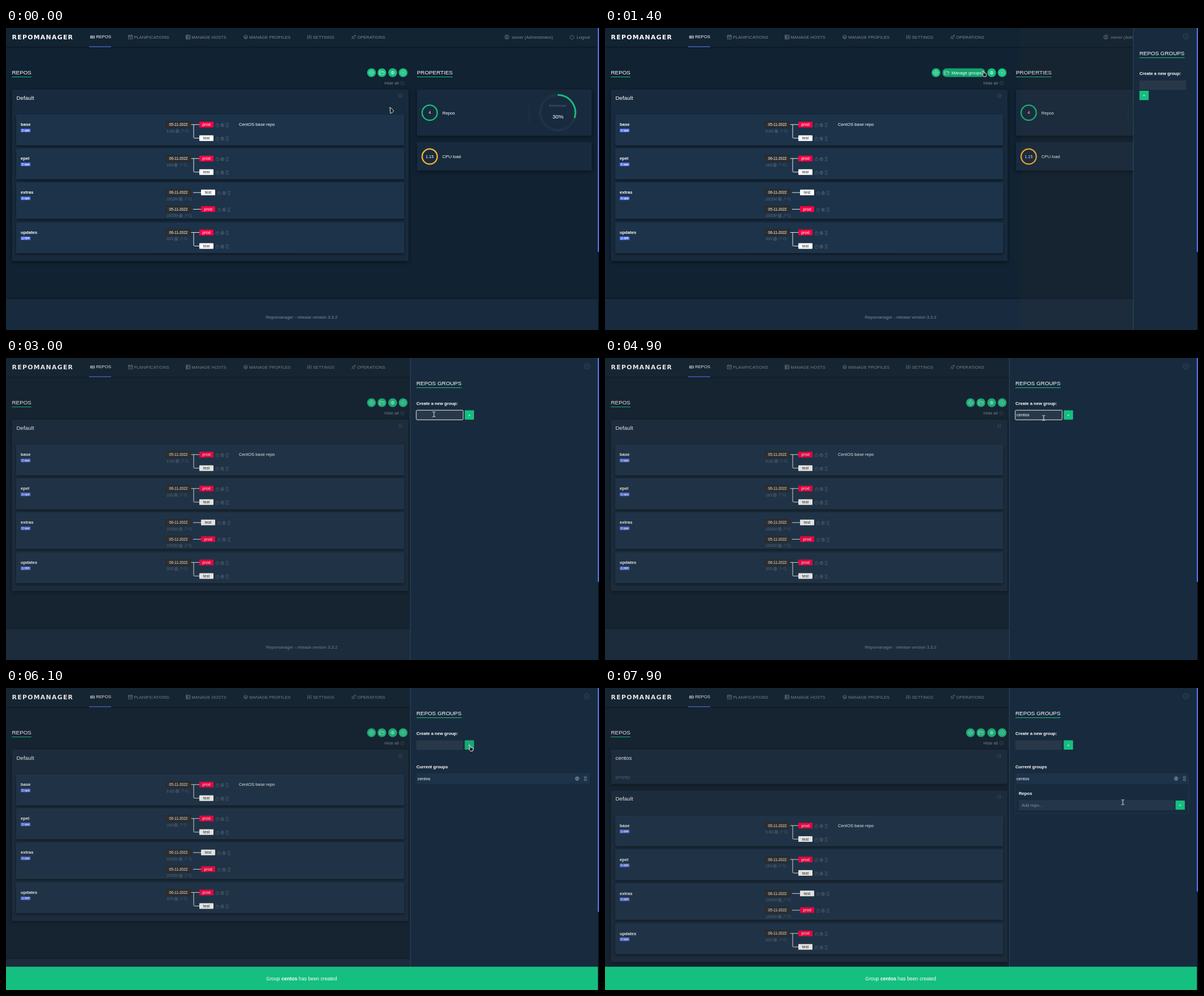
These frames come from a looping animation (1049x534 px, 8 s). An HTML page:

```html
<!DOCTYPE html>
<html lang="en">
<head>
<meta charset="utf-8">
<title>Repos groups</title>
<style>
  html, body { margin: 0; width: 100%; height: 100%; overflow: hidden; background: #112232; }
  svg { display: block; }
  text { font-family: "Liberation Sans", Arial, sans-serif; fill: #fff; white-space: pre; }
  .b { font-weight: bold; }
  .dim { opacity: .45; }
  .faint { opacity: .28; }
  .mid { text-anchor: middle; }
  .dark { fill: #1f1f1f; }
  .card { fill: #182b3e; filter: drop-shadow(0 2px 3px #0007); }
  .row { fill: #1d3349; stroke: #203a53; stroke-width: .7; filter: drop-shadow(0 2px 2px #0008); }
  .icon { fill: none; stroke: #fff; stroke-width: .7; }
  .icon.faint { opacity: .2; }
  .soft { opacity: .75; }
  .line { fill: none; stroke: #fff; stroke-width: .9; }
</style>
</head>
<body>
<svg id="stage" width="1049" height="534" viewBox="0 0 1049 534"></svg>
<script>
const GREEN = '#15bf7f', BLUE = '#5473e8', RED = '#ff0044', FIELD = '#283849';
const BODY = 7.66, TITLE = 9.83, SMALL = 6.5;

const ring = r => `M${-r} 0a${r} ${r} 0 1 1 ${2 * r} 0a${r} ${r} 0 1 1 ${-2 * r} 0`;
const ICONS = {
  server: 'M-3.5-2h7v4h-7zM-3.5 0h7M-2-1h2M-2 1h2',
  calendar: 'M-3.5-3h7v6.5h-7zM-3.5-1h7M-2-4v2M2-4v2M-2 1h4',
  hosts: 'M-3.5-3.5h7v7h-7zM-3.5-1.2h7M-3.5 1.2h7M-1.5-3.5v7',
  layers: 'M0-3.5L3.5-1.5L0 .5L-3.5-1.5zM-3.5 0L0 2L3.5 0M-3.5 1.5L0 3.5L3.5 1.5',
  sliders: 'M-2.8-3.5v7M0-3.5v7M2.8-3.5v7M-3.6 1.5h1.6M-.8-1.5h1.6M2 1h1.6',
  rocket: 'M-2.5 1Q0-3.5 3.5-3.5Q3.5 0-1 2.5zM-1.5-1L-3.5 0M1 1.5L0 3.5M-2.2 2L-3.7 3.7',
  user: ring(3.7) + 'M-2.4 2.6Q0 0 2.4 2.6' + 'M-1.2-1a1.2 1.2 0 1 1 2.4 0a1.2 1.2 0 1 1-2.4 0',
  power: 'M-2-2.8a3.6 3.6 0 1 0 4 0M0-4v3.5',
  globe: ring(3) + 'M-3 0h6M0-3v6M-2-2Q0-.5 2-2M-2 2Q0 .5 2 2',
  gear: ring(4) + ring(1.6) + 'M0-5.5v1.5M0 4v1.5M-5.5 0h1.5M4 0h1.5',
  folder: 'M-4.5 3.5v-7h3l1 1.3h4v1.5M-4.5 3.5l1.5-4.5h8l-1.5 4.5z',
  plus: ring(4.5) + 'M-2 0h4M0-2v4',
  down: ring(3.2) + 'M-1.5-.6L0 1L1.5-.6',
  close: ring(4.8) + 'M-1.8-1.8l3.6 3.6M1.8-1.8l-3.6 3.6',
  pick: 'M-3 3L1.5-1.5M-.5-3Q2.8-2.8 3 .5',
  search: 'M-2.8-.5a2.2 2.2 0 1 1 4.4 0a2.2 2.2 0 1 1-4.4 0M1 1.2L3 3.2',
  bag: 'M-2.5-.8h5v3.8h-5zM-1-.8v-2h2v2',
  bin: 'M-2.3-3.3h4.6M-2.3 3.3h4.6M-1.8-3.3v2.3h3.6v-2.3M-1.8 3.3v-2.3h3.6v2.3'
};

const text = (x, y, s, size = BODY, cls = '', attrs = '') =>
  `<text x="${x}" y="${y + size * .36}" font-size="${size}" class="${cls}" ${attrs}>${s}</text>`;
const rect = (x, y, w, h, fill, r = 0, attrs = '') =>
  `<rect x="${x}" y="${y}" width="${w}" height="${h}" fill="${fill}" rx="${r}" ${attrs}/>`;
const box = (x, y, w, h, cls, r = 1.5) => rect(x, y, w, h, 'none', r, `class="${cls}"`);
const icon = (name, x, y, cls = 'dim', scale = 1) =>
  `<path class="icon ${cls}" transform="translate(${x} ${y}) scale(${scale})" d="${ICONS[name]}"/>`;
const line = (d, cls = 'line') => `<path class="${cls}" d="${d}"/>`;
const group = (id, body) => `<g id="${id}">${body}</g>`;
const heading = (x, y, s, w) => text(x, y, s, TITLE) + rect(x, y + 8, w, 1, GREEN);
const plusButton = (id, x, y) =>
  `<g id="${id}">${rect(x, y, 16.4, 16.4, GREEN, .8)}${text(x + 8.2, y + 8.2, '+', BODY, 'mid')}</g>`;
const bubble = (name, x) =>
  `<circle cx="${x}" cy="79" r="7.8" fill="${GREEN}"/>` + icon(name, x, 79, 'soft', .92);

// The first item is the active page.
const navItem = ([x, name, label, gap = 6.2], i) => {
  const cls = i ? 'dim' : '';
  return icon(name, x, 16, cls) + text(x + gap, i ? 16 : 15.5, label, BODY, cls);
};

function tag(x, y, name) {
  const prod = name === 'prod';
  return rect(x, y - 5.2, 25, 10, prod ? RED : '#fff', .8) +
    text(x + 12.5, y - .3, name, 7.2, prod ? 'mid' : 'mid dark') +
    ['bag', 'globe', 'bin'].map((n, i) => icon(n, x + 32 + i * 8.7, y + .8, 'faint')).join('');
}

function snapshot(y, date, size, iconX) {
  return rect(283, y - 5.5, 44, 11, '#2f2f2f', 1, 'stroke="#222" stroke-width=".8"') +
    text(305, y, date, SMALL, 'mid') + text(284, y + 11.5, size, SMALL, 'faint') +
    ['globe', 'pick', 'search'].map((n, i) => icon(n, iconX + i * 8.6, y + 11.5, 'faint')).join('');
}

function repo(y, h, name, body) {
  return box(18.5, y, 685.5, h, 'row') + text(26, y + 17.2, name, BODY, 'b') +
    rect(26, y + 24.5, 17.3, 6.3, BLUE, 1.3) + icon('bag', 29.5, y + 27.6, '', .6) +
    text(33, y + 27.4, 'rpm', 4.6, 'b') + body;
}

const forked = (y, date, size, iconX) =>
  line(`M327 ${y + 17.3}h15M332 ${y + 17.3}V${y + 39.8}q0 1.5 1.5 1.5H342`) +
  snapshot(y + 17.3, date, size, iconX) + tag(342, y + 17.5, 'prod') + tag(342, y + 41.4, 'test');
const single = (y, date, name) =>
  line(`M331 ${y}h14`) + snapshot(y, date, '1002M', 309) + tag(345, y, name);

const gauge = (y, color, value, label) =>
  `<circle cx="749.5" cy="${y}" r="13.4" fill="none" stroke="${color}" stroke-width="2.3"/>` +
  text(749.5, y - .3, value, 7.2, 'mid') + text(772, y + .4, label);

const nav = [
  [153, 'server', 'REPOS'], [220, 'calendar', 'PLANIFICATIONS'], [322, 'hosts', 'MANAGE HOSTS'],
  [424, 'layers', 'MANAGE PROFILES'], [536.5, 'sliders', 'SETTINGS'], [615, 'rocket', 'OPERATIONS'],
  [886, 'user', 'owner (Administrator)', 8.4], [1001, 'power', 'Logout', 8.4]
].map(navItem).join('');

const page =
  rect(0, 0, 1049, 534, '#112232') +
  rect(0, 0, 1049, 33.3, '#122332', 0, 'style="filter:drop-shadow(0 1px 1px #0006)"') +
  text(10.5, 16, 'REPOMANAGER', 11, 'b', 'style="font-family:\'DejaVu Sans\',sans-serif;letter-spacing:1.2px"') +
  nav + rect(147, 32.5, 39, 1.2, BLUE) +
  heading(10.5, 78, 'REPOS', 34.5) +
  group('gear', bubble('gear', 646.5)) +
  `<svg id="pill" y="71.2" height="15.6">
    <rect width="100%" height="15.6" rx="7.8" fill="${GREEN}"/>
    <rect id="shade" width="100%" height="15.6" rx="7.8"/>
    ${icon('folder', 7.8, 7.8, 'soft', .92)}${text(16.5, 7.8, 'Manage groups')}</svg>` +
  bubble('globe', 684) + bubble('plus', 702.5) +
  text(669.5, 97, 'Hide all', BODY, 'dim') + icon('down', 701.3, 97.5, 'faint') +
  group('newGroup', box(10.5, 109, 701.5, 60.5, 'card') + text(18.5, 123.5, 'centos', TITLE) +
    icon('down', 697.5, 120, 'faint') + text(18.5, 157.7, '(empty)', BODY, 'faint')) +
  group('list',
    box(10.5, 109, 701.5, 303, 'card') + text(18.5, 123.5, 'Default', TITLE) + icon('down', 697.5, 120, 'faint') +
    repo(153.5, 53.5, 'base', forked(153.5, '05-11-2022', '9.0G', 303) + text(412, 170.6, 'CentOS base repo')) +
    repo(213.5, 53.5, 'epel', forked(213.5, '06-11-2022', '16G', 300.5)) +
    repo(273.5, 63.5, 'extras', single(291, '06-11-2022', 'test') + single(320.5, '05-11-2022', 'prod')) +
    repo(344.2, 53.5, 'updates', forked(344.2, '06-11-2022', '30G', 301)) +
    rect(0, 479, 1049, 120, '#182b3e', 0, 'style="filter:drop-shadow(0 -1px 1px #0005)"') +
    text(523, 511, 'Repomanager - release version 3.3.2', BODY, 'mid dim')) +
  heading(727, 78, 'PROPERTIES', 63) +
  box(727, 109, 309, 81.5, 'card') + box(727, 201.5, 309, 50.5, 'card') +
  gauge(149.8, GREEN, '4', 'Repos') + gauge(227.3, '#ffb536', '1.15', 'CPU load') +
  rect(925, 136, .7, 32, '#22384d') +
  `<g transform="translate(976 149.5)" fill="none"><path d="${ring(32.5)}${ring(30)}" stroke="#34485b" stroke-width=".7"/>
    <path d="M0-31.2A31.2 31.2 0 0 1 29.7 9.6" stroke="${GREEN}" stroke-width="2.7"/></g>` +
  text(976, 136.5, '/home/repo', 6.13, 'mid faint') + text(976.5, 156, '30%', TITLE, 'mid');

const side =
  rect(715, 0, 334, 534, '#182b3e') + rect(714.7, 0, 1, 534, '#31465a') +
  heading(726, 44, 'REPOS GROUPS', 80) + text(726, 79.8, 'Create a new group:', BODY, 'b') +
  rect(726, 92.8, 82.3, 16.4, FIELD, .8) +
  rect(725.7, 92.3, 83, 17, 'none', 1.8, 'id="focus" stroke="#fff" stroke-width=".9"') +
  text(728, 100.6, '', BODY, '', 'id="typed"') + rect(0, 96, .7, 9, '#fff', 0, 'id="caret"') +
  plusButton('add', 811.5, 92.6) +
  group('groups', text(726, 138.8, 'Current groups', BODY, 'b') + rect(726, 151, 306.5, 18.5, '#1c3349', 1) +
    text(728, 159.8, 'centos') + icon('globe', 1010.3, 160.2, 'dim', 1.1) + icon('bin', 1025, 160.2)) +
  `<svg id="config" x="726" y="169.5" width="307">` +
  rect(726.4, 169, 305.8, 53, 'none', 1, 'stroke="#1f3a54" stroke-width=".8"') +
  text(732, 186.3, 'Repos', BODY, 'b') + rect(732, 198.3, 275.5, 17.6, '#23364a', .8) +
  text(737, 207.2, 'Add repo...', BODY, 'dim') + plusButton('addRepo', 1009.3, 198.9) + '</svg>';

stage.innerHTML = page +
  rect(0, 0, 1049, 534, '#333', 0, 'id="veil" opacity=".14"') +
  group('side', side) + group('close', icon('close', 1027.6, 14.7, 'faint')) +
  group('toast', rect(0, 492.8, 1049, 42, GREEN) +
    text(523, 513.5, 'Group <tspan class="b">centos</tspan> has been created', 8.77, 'mid')) +
  rect(1047, 0, 2, 534, '#0f1a26') + rect(1046.8, -2, 2.4, 398, BLUE, 1.2, 'id="thumb"') +
  '<path id="cursor" stroke="#fff" stroke-width=".9" stroke-linejoin="round"/>';

const SHAPES = {
  arrow: 'M0 0L1 10.6L3.2 10.4L6.6 7.2Q6.8 5.6 5.4 4.6z',
  hand: 'M1 0Q2.2-.4 2.7 1L3.6 3.4L7 4.2Q8.2 5 7.6 7.2L7 10H3L0 6.4Q0 5 2 6z',
  beam: 'M-2.6-4.4Q0-4.4 0-3.4Q0-4.4 2.6-4.4M0-3.4V3.4M-2.6 4.4Q0 4.4 0 3.4Q0 4.4 2.6 4.4'
};
// time, x, y, pointer shape
const PATH = [
  [50, 679, 140, 'arrow'], [400, 667, 76, 'hand'], [1750, 667, 76, 'hand'], [2100, 757, 99.5, 'beam'],
  [4850, 757, 99.5, 'beam'], [4900, 776, 106, 'beam'], [5250, 818.5, 101.5, 'hand'], [6100, 818.5, 101.5, 'hand'],
  [6700, 976, 151, 'arrow'], [7100, 1010, 157.5, 'hand'], [7500, 1010, 157.5, 'hand'], [7900, 916, 202, 'beam']
];
const KEYS = [3400, 3600, 3800, 3900, 4100, 4300];

const $ = id => document.getElementById(id);
const set = (id, attrs) => { for (const k in attrs) $(id).setAttribute(k, attrs[k]); };
const show = (id, on) => set(id, { visibility: on ? 'visible' : 'hidden' });
const ramp = (t, a, b) => (1 - Math.cos(Math.PI * Math.min(1, Math.max(0, (t - a) / (b - a))))) / 2;

function moveCursor(t) {
  const last = PATH.length - 1, found = PATH.findIndex(p => p[0] > t);
  const next = found < 0 ? last : Math.max(1, found);
  const a = PATH[next - 1], b = PATH[next], k = ramp(t, a[0], b[0]);
  const shape = a[3] === b[3] || k < .03 ? a[3] : k > .8 ? b[3] : 'arrow';
  const at = i => a[i] + (b[i] - a[i]) * k;
  set('cursor', { d: SHAPES[shape], transform: `translate(${at(1)} ${at(2)})`, fill: shape === 'beam' ? 'none' : '#1a1f26' });
}

function draw(t) {
  const open = ramp(t, 250, 700) - ramp(t, 1600, 2060);
  set('pill', { x: 657.2 - 60.6 * open, width: 15.6 + 60.6 * open });
  set('shade', { opacity: .15 * open });
  set('gear', { transform: `translate(${-61 * open})` });

  const slide = ramp(t, 1110, 1900), width = slide && 21 + 313 * slide;
  set('veil', { x: 1049 * (1 - slide) });
  set('side', { transform: `translate(${334 - width})` });
  show('side', slide > 0);
  show('close', width > 30);
  set('add', { transform: width < 125 ? 'translate(-85.5 18.4)' : '', opacity: t > 5230 && t < 6220 ? .86 : 1 });

  const sent = t >= 5300, count = sent ? 0 : KEYS.filter(k => k <= t).length;
  $('typed').textContent = 'centos'.slice(0, count);
  show('focus', t >= 2300 && !sent);
  show('caret', t >= 2300 && t < 3000 || t >= 3400 && t < 4900);
  set('caret', { x: 728.1 + (count ? $('typed').getComputedTextLength() : 0) });
  show('groups', t >= 5500);
  set('toast', { transform: `translate(0 ${42 * (1 - ramp(t, 5350, 5700))})` });

  const added = t >= 6400;
  show('newGroup', added);
  set('list', { transform: `translate(0 ${added ? 72.4 : 0})` });
  set('thumb', { height: added ? 362 : 398 });

  const unfold = ramp(t, 7350, 7750), height = 53 * unfold;
  show('config', unfold > 0);
  set('config', { height, viewBox: `726 169.5 307 ${Math.max(height, .1)}` });
  moveCursor(t);
}

function tick() {
  draw(performance.now() % 8000);
  requestAnimationFrame(tick);
}
tick();
</script>
</body>
</html>
```
